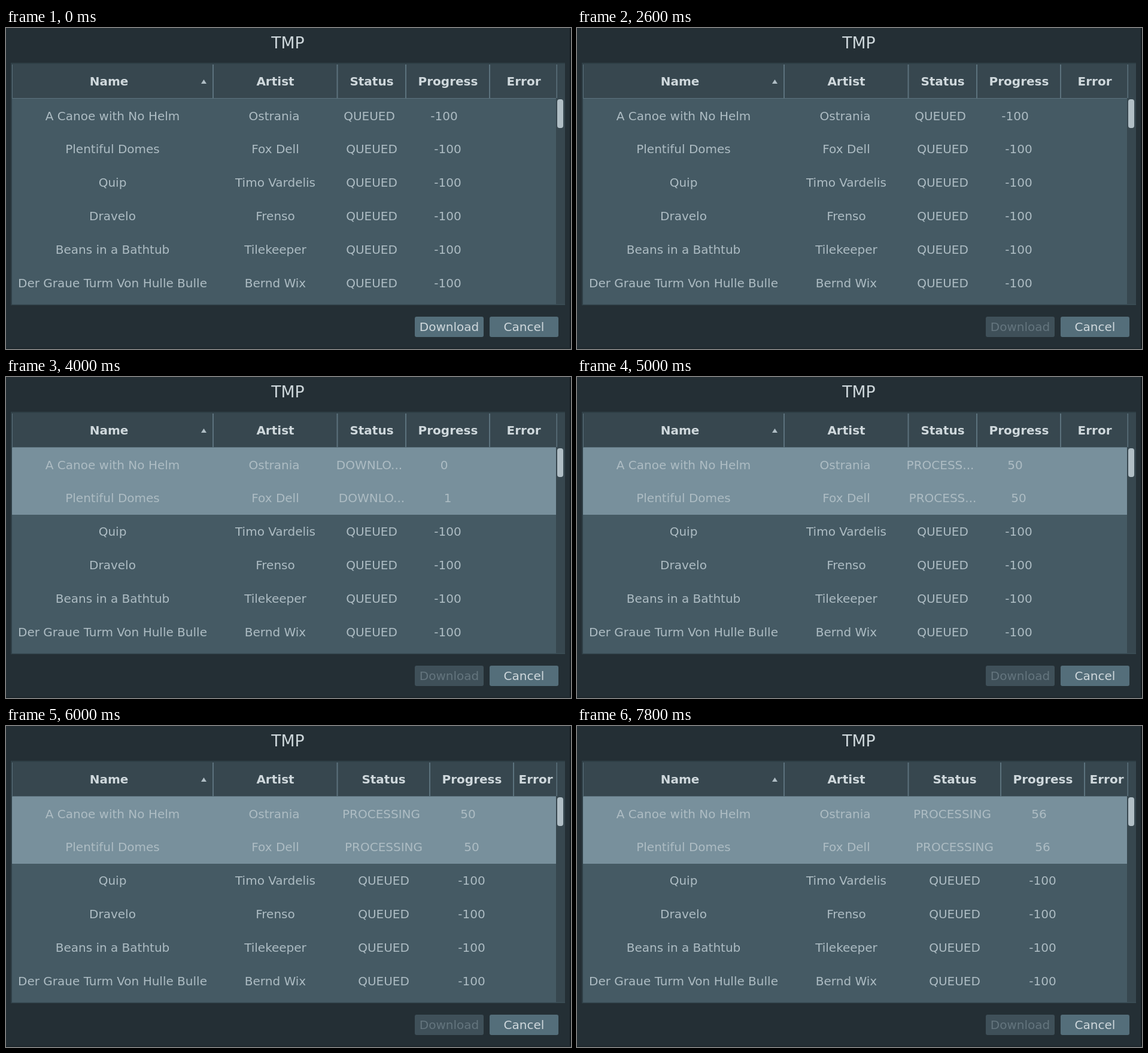
Write an HTML page that moves like this. It is 944 px wide and 536 px high and loops after 8 s.

```html
<!DOCTYPE html>
<html lang="en">
<head>
<meta charset="utf-8">
<title>Download list</title>
<style>
  html, body { margin: 0; width: 100%; height: 100%; overflow: hidden; background: #242f35; }
  svg { display: block; width: 944px; height: 536px; }
  text { font: 20px "DejaVu Sans", sans-serif; text-anchor: middle; fill: #adbcc3; }
  .title { font-size: 26.67px; fill: #cfd8dc; }
  .head text { font-weight: bold; fill: #cfd8dc; }
  .button rect { fill: #546e7a; }
  .button text { fill: #cfd8dc; }
  .button.off rect { fill: #3f5059; }
  .button.off text { fill: #64757e; }
  .line { fill: #5c727d; }
</style>
</head>
<body>
<svg viewBox="0 0 944 536">
  <rect width="944" height="536" fill="#242f35"/>
  <rect x="942" width="2" height="536" fill="#12191d"/>
  <rect y="534" width="944" height="2" fill="#1d272c"/>
  <text class="title" x="471" y="34">TMP</text>

  <rect x="8" y="58" width="926" height="405" fill="#2f3f46"/>
  <rect x="10" y="60" width="924" height="401" fill="#37474f"/>
  <rect x="10" y="118" width="909" height="343" fill="#455a64"/>
  <rect class="line" x="10" y="117" width="909" height="1"/>
  <rect x="10" y="461" width="924" height="1" fill="#3f525b"/>
  <rect id="active" x="10" y="118" width="909" height="112" fill="#78909c"/>
  <rect x="921" y="119" width="10" height="48" rx="4" fill="#b0bec5"/>

  <g class="head" id="head">
    <rect class="line" x="10" y="61" width="1" height="56"/>
    <rect class="line" x="345" y="61" width="2" height="56"/>
    <rect class="line" x="552.5" y="61" width="2" height="56"/>
    <rect class="line" x="919.5" y="61" width="1.5" height="56"/>
    <text x="172" y="96">Name</text>
    <path d="M326 93h9l-4.500-7z" fill="#b0bec5"/>
    <text x="450" y="96">Artist</text>
  </g>
  <g id="rows"></g>

  <g class="button" id="download">
    <rect x="683" y="482" width="115" height="34" rx="3"/>
    <text x="740.5" y="506">Download</text>
  </g>
  <g class="button">
    <rect x="808" y="482" width="115" height="34" rx="3"/>
    <text x="865.5" y="506">Cancel</text>
  </g>
</svg>

<script>
const LOOP = 8000, STEP = 100;
const STATUS_WIDTH = 115;
const $ = id => document.getElementById(id);

const songs = [
  ["A Canoe with No Helm", "Ostrania"],
  ["Plentiful Domes", "Fox Dell"],
  ["Quip", "Timo Vardelis"],
  ["Dravelo", "Frenso"],
  ["Beans in a Bathtub", "Tilekeeper"],
  ["Der Graue Turm Von Hulle Bulle", "Bernd Wix"]
];

// [start time, value] pairs for the two active rows
const processing = [[6800, 51], [7000, 52], [7300, 54], [7500, 55], [7800, 56]];
const status = [
  [[0, "QUEUED"], [4000, "DOWNLOADING"], [4900, "PROCESSING"]],
  [[0, "QUEUED"], [4000, "DOWNLOADING"], [4500, "PROCESSING"]]
];
const progress = [
  [[0, -100], [4000, 0], [4300, 6], [4500, 28], [4900, 50], ...processing],
  [[0, -100], [4000, 1], [4300, 18], [4500, 50], ...processing]
];

function add(parent, tag, attrs, label = "") {
  const node = document.createElementNS("http://www.w3.org/2000/svg", tag);
  for (const key in attrs) node.setAttribute(key, attrs[key]);
  node.textContent = label;
  parent.append(node);
  return node;
}

// Parts that follow the column resize: [node, x at rest, share of the shift]
const movers = [];
function mover(parent, tag, x, share, attrs, label) {
  const node = add(parent, tag, { x, ...attrs }, label);
  movers.push([node, x, share]);
  return node;
}

const head = $("head");
for (const x of [667, 807])
  mover(head, "rect", x, 1, { class: "line", y: 61, width: 2, height: 56 });
mover(head, "text", 611, 0.5, { y: 96 }, "Status");
mover(head, "text", 738.5, 1, { y: 96 }, "Progress");
mover(head, "text", 865, 0.5, { y: 96 }, "Error");

const cells = songs.map(([name, artist], i) => {
  const rows = $("rows");
  const y = i ? 153 + 56 * i : 154;
  add(rows, "text", { x: 178, y }, name);
  add(rows, "text", { x: i ? 450 : 448, y }, artist);
  return {
    status: mover(rows, "text", i ? 611 : 607, 0.5, { y }, "QUEUED"),
    progress: mover(rows, "text", i ? 738 : 732, 1, { y }, "-100")
  };
});

const pen = document.createElement("canvas").getContext("2d");
pen.font = '20px "DejaVu Sans", sans-serif';

function elide(label, width) {
  let shown = label;
  for (let n = label.length - 1; n > 0 && pen.measureText(shown).width > width; n--)
    shown = label.slice(0, n) + "...";
  return shown;
}

const valueAt = (track, t) => track.filter(([start]) => start <= t).pop()[1];

function draw(t) {
  const shift = Math.min(40, Math.max(0, (t - 5600) / 10));
  for (const [node, x, share] of movers) node.setAttribute("x", x + shift * share);
  for (const i of [0, 1]) {
    cells[i].status.textContent = elide(valueAt(status[i], t), STATUS_WIDTH + shift);
    cells[i].progress.textContent = valueAt(progress[i], t);
  }
  $("active").style.visibility = t >= 4000 ? "visible" : "hidden";
  $("download").classList.toggle("off", t >= 500);
}

const begin = performance.now();
let last = -1;
function tick() {
  const t = Math.floor(((performance.now() - begin) % LOOP) / STEP) * STEP;
  if (t !== last) draw(last = t);
  requestAnimationFrame(tick);
}
tick();
</script>
</body>
</html>
```
